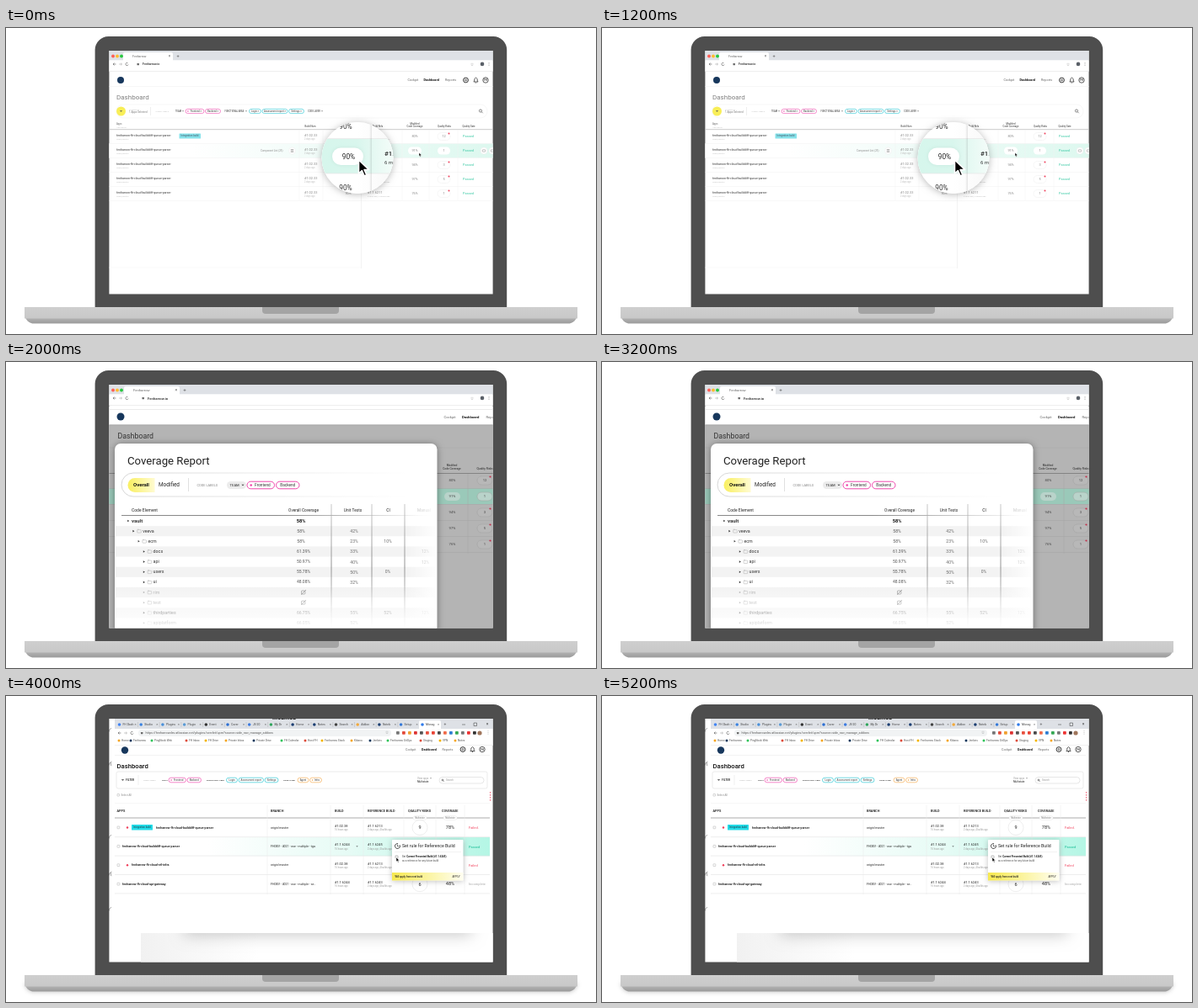
An HTML page with a canvas for the animation above (6000 ms loop, 700x364 px).

```html
<!DOCTYPE html>
<html lang="en">
<head>
<meta charset="utf-8">
<title>Dashboard tour</title>
<style>
html, body { margin: 0; width: 100%; height: 100%; overflow: hidden; background: #fff; }
canvas { display: block; width: 700px; height: 364px; }
</style>
</head>
<body>
<canvas id="stage" width="700" height="364"></canvas>
<script>
const c = document.getElementById('stage').getContext('2d');
const PINK = '#ee3fa8', CYAN = '#1fc3d0', GREEN = '#2fc6a0', RED = '#f0405c', ORANGE = '#f5a84a', NAVY = '#17375c';
const APP = 'fenharrow-fh-cloud-builddiff-queue-parser';

// ---- helpers ----
function text(s, x, y, size, color = '#333', weight = 400, align = 'left') {
  c.font = `${weight} ${size}px Roboto, sans-serif`;
  c.fillStyle = color;
  c.textAlign = align;
  c.textBaseline = 'middle';
  c.fillText(s, x, y);
}
const mid = (s, x, y, size, color, weight) => text(s, x, y, size, color, weight, 'center');

function rect(x, y, w, h, fill) {
  c.fillStyle = fill;
  c.fillRect(x, y, w, h);
}
function box(x, y, w, h, r, fill, stroke, lw = 0.6) {
  c.beginPath();
  c.roundRect(x, y, w, h, r);
  if (fill) { c.fillStyle = fill; c.fill(); }
  if (stroke) { c.strokeStyle = stroke; c.lineWidth = lw; c.stroke(); }
}
function dot(x, y, r, fill, stroke, lw = 0.6) {
  box(x - r, y - r, 2 * r, 2 * r, r, fill, stroke, lw);
}
function path(points, color, lw = 0.6, fill) {
  c.beginPath();
  points.forEach(([x, y]) => c.lineTo(x, y));
  if (fill) { c.closePath(); c.fillStyle = fill; c.fill(); }
  if (color) { c.strokeStyle = color; c.lineWidth = lw; c.lineJoin = 'round'; c.stroke(); }
}
const line = (x1, y1, x2, y2, color, lw) => path([[x1, y1], [x2, y2]], color, lw);

function fade(x1, y1, x2, y2, ...colors) {
  const g = c.createLinearGradient(x1, y1, x2, y2);
  colors.forEach((color, i) => g.addColorStop(i / (colors.length - 1), color));
  return g;
}
function shadowed(blur, dy, color, draw) {
  c.save();
  c.shadowBlur = blur;
  c.shadowOffsetY = dy;
  c.shadowColor = color;
  draw();
  c.restore();
}
function caret(x, y, s, color = '#333') {
  path([[x - s, y - s / 2], [x + s, y - s / 2], [x, y + s / 2]], null, 0, color);
}
function cursor(x, y, s) {
  const shape = [[0, 0], [0, 16], [3.8, 12.6], [6.6, 19], [9.4, 17.8], [6.6, 11.6], [12, 11.4]];
  path(shape.map(([a, b]) => [x + a * s, y + b * s]), '#fff', 1.6 * s, '#000');
}
function pill(label, x, w, y, h, size, color, marked) {
  box(x, y - h / 2, w, h, h / 2, '#fff', color, h / 9);
  if (marked) dot(x + h * 0.55, y, h / 7, color);
  mid(label, x + w / 2 + (marked ? h * 0.25 : 0), y + 0.2, size, '#333');
}
function search(x, y, r) {
  dot(x, y, r, null, '#444');
  line(x + r * 0.7, y + r * 0.7, x + r * 1.7, y + r * 1.7, '#444');
}
function menuIcons([gear, bell, user], y) {
  dot(gear, y, 2.9, null, '#333', 1);
  dot(gear, y, 1, null, '#333', 0.7);
  path([[bell - 2.6, y + 2], [bell - 1.8, y + 1], [bell - 1.6, y - 1.5], [bell, y - 3],
    [bell + 1.6, y - 1.5], [bell + 1.8, y + 1], [bell + 2.6, y + 2], [bell - 2.6, y + 2]], '#333', 0.8);
  dot(bell, y + 3, 0.6, '#333');
  dot(user, y, 3.2, null, '#333', 0.8);
  mid('FH', user, y + 0.2, 2.8, '#333', 700);
}
function nav(y, xs, size) {
  ['Cockpit', 'Dashboard', 'Reports'].forEach((s, i) =>
    text(s, xs[i], y, size, i === 1 ? '#111' : '#666', i === 1 ? 700 : 400));
}
function browserArrows(y, x = 127) {
  path([[x + 1.5, y - 1.4], [x, y], [x + 1.5, y + 1.4]], '#555');
  line(x, y, x + 3.4, y, '#555');
  path([[x + 9, y - 1.4], [x + 10.5, y], [x + 9, y + 1.4]], '#aaa');
  line(x + 7, y, x + 10.5, y, '#aaa');
  c.beginPath();
  c.arc(x + 16.5, y, 1.6, 0.3, 5.4);
  c.strokeStyle = '#555';
  c.stroke();
}
function simpleBrowser(y, tabX, tabW, urlX, size) {
  rect(122, 27, 456, y + 5 - 27, '#dee1e6');
  box(tabX, 29, tabW, y + 6 - 29, [2, 2, 0, 0], '#fff');
  ['#ff5f57', '#febc2e', '#28c840'].forEach((color, i) => dot(127 + i * 5, y, 1.9, color));
  text('Fenharrow', tabX + 11, y + 0.3, size, '#666');
  mid('×', tabX + tabW - 4, y, size + 1, '#555');
  mid('+', tabX + tabW + 6, y, size + 2, '#555');
  rect(122, y + 5, 456, 13, '#fff');
  browserArrows(y + 9.5);
  box(urlX - 6.5, y + 8.6, 2.4, 2.2, 0.4, '#666');
  text('Fenharrow.io', urlX, y + 9.8, size, '#222', 500);
  mid('☆', 553, y + 9.6, 5, '#777');
  dot(565, y + 9.4, 2.3, '#5a6068');
  for (let i = -1; i < 2; i++) dot(573, y + 9.4 + i * 1.5, 0.45, '#555');
  line(122, y + 18, 578, y + 18, '#e2e2e2');
}

function screenPath() {
  c.beginPath();
  c.rect(122.4, 27, 455.2, 289.6);
}
function laptop(lifted) {
  rect(0, 0, 700, 364, '#fff');
  box(105.6, 10, 488.6, 325, [16, 16, 0, 0], '#4e4e4e');
  screenPath();
  c.fillStyle = '#fff';
  c.fill();
  const underside = () => box(22, 340, 656, 11.5, [0, 0, 28, 28], fade(0, 345, 0, 351, '#b4b4b4', '#9c9c9c'));
  if (lifted) shadowed(5, 1, 'rgba(0,0,0,.2)', underside);
  else underside();
  rect(22, 332, 656, 13.5, fade(0, 332, 0, 346, '#cfcfcf', '#c8c8c8'));
  box(304, 332, 91, 8, [0, 0, 4, 4], '#a4a4a4');
}

const metrics = [['80%', '12'], ['91%', '1'], ['94%', '3'], ['97%', '5'], ['76%', '1']];

// ---- scenes ----
function overview() {
  simpleBrowser(33.5, 139, 59, 162, 3.5);
  dot(136, 62, 4, NAVY);
  nav(62, [476.5, 495.5, 521], 3.8);
  menuIcons([545.5, 557.5, 569], 62);
  line(122, 69.5, 578, 69.5, '#f2f2f2');
  text('Dashboard', 131, 82.5, 8, '#808080');

  box(131, 91, 440, 16, 8, '#fff', '#f1f1f1');
  dot(136.5, 99, 5.5, '#f8ee57');
  caret(136.5, 99, 1.6, '#555');
  text('FILTERED BY', 146, 97, 2.2, '#bbb');
  text('1 Apps Selected', 146, 100.5, 3, '#777');
  line(171.5, 94, 171.5, 104, '#ddd', 0.5);
  text('CODE LABELS', 177.5, 99, 2.5, '#bbb');
  text('TEAM', 201, 99, 2.6);
  text('FUNCTIONAL AREA', 259.5, 99, 2.6);
  text('CODE LAYER', 358, 99, 2.6);
  [210, 285, 375].forEach(x => caret(x, 99, 0.9));
  pill('Frontend ×', 213, 22, 99, 5.2, 2.8, PINK, true);
  pill('Backend ×', 236.5, 18, 99, 5.2, 2.8, PINK);
  pill('Login ×', 288.5, 14, 99, 5.2, 2.8, CYAN);
  pill('Assessment report ×', 304, 30, 99, 5.2, 2.8, CYAN);
  pill('Settings ×', 335.5, 18, 99, 5.2, 2.8, CYAN);
  search(563, 98.5, 1.6);

  text('Apps', 131, 114, 2.8, '#666');
  text('App Name', 131, 117.8, 2.5, '#bbb');
  mid('Build Num', 361, 117.5, 2.8);
  mid('Build Refs', 441, 117.5, 2.8);
  mid('Modified', 485, 114, 2.8);
  mid('Code Coverage', 485, 117.6, 2.8);
  mid('Quality Risks', 520, 117.5, 2.8);
  mid('Quality Gate', 549, 117.5, 2.8);
  line(122, 120.7, 578, 120.7, '#bcbcbc', 0.8);

  rect(122, 137.5, 456, 17, fade(220, 0, 578, 0, '#fff', '#eefbf7', '#ddf8ef'));
  metrics.forEach(([coverage, risks], i) => {
    const y = 129 + i * 17, active = i === 1;
    text(APP, 131, y - 1.4, 3.5, '#333');
    text('origin/master', 131, y + 3.2, 2.4, '#bbb');
    text('#1.02.33', 354, y - 1, 3.9, '#888');
    text('2 days ago', 354, y + 3.4, 2.6, '#bbb');
    mid('90%', 406, y, 3.9, '#888');
    text('#1.1.6211', 429, y - 1, 3.9, '#888');
    text('6 mon ago, 6 builds ago', 429, y + 3.4, 2.5, '#bbb');
    if (active) box(477, y - 4.5, 16, 9, 4.5, '#fff');
    box(512, y - 4.5, 15, 9, 4.5, '#fff', active ? null : '#ececec', 0.5);
    mid(coverage, 485, y, 3.9, '#888');
    mid(risks, 519.5, y, 3.9, '#888');
    if (!active) dot(525.5, y - 3.5, 1, RED);
    mid('Passed', 548.5, y, 3.9, GREEN);
    line(122, y + 8.5, 578, y + 8.5, '#f1f1f1', 0.5);
  });
  box(205.5, 125.5, 25.5, 6, 0.5, '#86e2ea');
  mid('Integration build', 218, 128.6, 2.9, '#456');
  text('Component List (25)', 302, 146, 2.9, '#888');
  dot(339.5, 146, 4, '#fff', '#e8e8e8', 0.4);
  for (let i = -1; i < 2; i++) line(337.8, 146 + i * 1.4, 341.2, 146 + i * 1.4, '#666', 0.5);
  [567, 577].forEach(x => {
    dot(x, 146, 4, '#fff', '#e8e8e8', 0.4);
    box(x - 1.7, 144.8, 3.4, 2.4, 0.4, null, '#888', 0.5);
  });
  [348, 376, 470, 502, 536].forEach(x => line(x, 122, x, 205, '#f2f2f2', 0.5));
  line(421.5, 122, 421.5, 286, '#ebebeb', 0.6);
  line(122, 285, 421, 285, '#f6f6f6', 0.6);
  cursor(490, 148.5, 0.25);
  magnifier();
}

function magnifier() {
  shadowed(9, 1, 'rgba(0,0,0,.28)', () => dot(417, 154.5, 42.5, '#fff'));
  c.save();
  c.beginPath();
  c.arc(417, 154.5, 42.5, 0, Math.PI * 2);
  c.clip();
  rect(374, 111, 86, 87, fade(374, 0, 460, 0, '#fff', '#fff', '#f8f8f8'));
  rect(374, 132, 86, 41, fade(374, 0, 460, 0, '#d6f6ec', '#d9f6ed', '#f4fcf9'));
  [131.5, 173].forEach(y => line(374, y, 460, y, '#e6e6e6', 0.7));
  rect(431, 111, 3, 87, fade(431, 0, 434, 0, 'rgba(0,0,0,0)', 'rgba(0,0,0,.1)'));
  mid('90%', 403, 118, 8.3, '#333');
  mid('90%', 403, 190.5, 8.3, '#333');
  shadowed(4, 0, 'rgba(0,60,40,.08)', () => box(387, 142.5, 37, 20.5, 10.2, '#fff'));
  mid('90%', 406.5, 153.5, 8.3, '#222');
  text('#1.1.6211', 449, 150, 7.8, '#222', 500);
  text('6 mon ago', 449, 160.5, 6, '#333');
  c.restore();
  cursor(418.5, 157, 1);
}

function report() {
  simpleBrowser(33.5, 140, 66, 168, 4.2);
  rect(122, 53, 456, 22, '#fff');
  line(122, 56.5, 578, 56.5, '#ddd');
  dot(136, 65, 4.5, NAVY);
  nav(65.3, [519.5, 541, 569.5], 4.2);

  rect(122, 74.5, 456, 243, '#b4b4b4');
  line(122, 75, 578, 75, '#9f9f9f');
  text('Dashboard', 132.5, 88, 8.8, '#333');
  line(122, 102, 578, 102, '#a6a6a6', 0.5);
  mid('Modified', 529, 123.5, 3.2, '#222');
  mid('Code Coverage', 529, 127.5, 3.2, '#222');
  text('Quality Risks', 558.5, 127, 3.4, '#222');
  line(122, 132.5, 578, 132.5, '#777', 0.8);
  rect(122, 150.5, 456, 18.5, '#9ac9b9');
  metrics.forEach(([coverage, risks], i) => {
    const y = 141 + i * 19;
    if (i === 1) box(520, y - 5, 19, 10, 5, '#b9d3ca');
    box(559, y - 5, 18, 10, 5, i === 1 ? '#b9d3ca' : '#b8b8b8', '#a0a0a0', 0.5);
    mid(coverage, 529.5, y, 4.2, '#444');
    mid(risks, 568, y, 4.2, '#444');
    if (i !== 1) dot(574.5, y - 4.5, 1.1, '#c5304c');
    line(122, y + 9.5, 578, y + 9.5, '#a2a2a2', 0.5);
  });
  line(548, 133, 548, 228, '#a4a4a4', 0.5);

  shadowed(8, 1, 'rgba(0,0,0,.4)', () => box(129, 97, 382.5, 230, 7, '#fff'));
  text('Coverage Report', 144, 118, 13.2, '#222');
  const edge = fade(137, 0, 480, 0, '#ccc', '#e6e6e6', '#fff');
  box(137, 132, 365, 28, 14, '#fff', edge, 0.8);
  box(144.5, 138, 32, 17, [8.5, 0, 0, 8.5], fade(144, 0, 176, 0, '#f9ef5e', '#fffbd0'));
  text('Overall', 151, 146.5, 6, '#111', 700);
  text('Modified', 181, 146.5, 6.4, '#222');
  line(216.5, 138, 216.5, 154, '#ccc');
  text('CODE LABELS', 226.5, 146.5, 3.9, '#888');
  box(262, 142, 23, 9, 4.5, '#ececec');
  text('TEAM', 265.5, 146.6, 4.2);
  caret(281, 146.6, 1.5);
  pill('Frontend', 286, 32.5, 146.5, 8.6, 4.7, PINK, true);
  pill('Backend', 320.5, 27.5, 146.5, 8.6, 4.7, PINK);

  text('Code Element', 149, 177, 5, '#222');
  mid('Overall Coverage', 353, 177, 4.8, '#222');
  mid('Unit Tests', 411.5, 177, 4.8, '#222');
  mid('CI', 453.5, 177, 4.8, '#222');
  text('Manual', 488, 177, 4.8, '#aaa');
  // name, depth, overall, unit tests, CI
  const tree = [
    ['vault', 0, '58%'], ['veeva', 1, '58%', '42%'], ['ecm', 2, '58%', '23%', '10%'],
    ['docs', 3, '61.39%', '33%'], ['api', 3, '50.97%', '40%'], ['users', 3, '55.78%', '50%', '0%'],
    ['ui', 3, '48.08%', '32%'], ['rim', 3, '-'], ['test', 3, '-'],
    ['thirdparties', 3, '66.75%', '55%', '52%'], ['apiplatform', 3, '66.05%', '52%']
  ];
  tree.forEach(([name, depth, overall, unit = '', ci = ''], i) => {
    const y = 189 + i * 12.15, x = 145 + depth * 6.2;
    const off = overall === '-', ink = off ? '#aaa' : '#333';
    if (i % 2) rect(130, y - 6, 381, 12.1, '#f3f3f3');
    path([[x - 0.8, y - 1.3], [x + 1.2, y], [x - 0.8, y + 1.3]], null, 0, ink);
    if (depth) {
      box(x + 4.5, y - 1.5, 4.6, 3.4, 0.5, null, '#aaa', 0.5);
      line(x + 4.5, y - 2, x + 6.5, y - 2, '#aaa', 0.5);
    }
    text(name, depth ? x + 11 : 149, y, depth ? 5.3 : 6, ink, depth ? 400 : 700);
    if (off) {
      box(350.5, y - 2, 4.4, 4, 0.8, null, '#777', 0.6);
      line(350, y + 2.8, 356, y - 3, '#777', 0.7);
    } else {
      mid(overall, depth < 3 ? 350 : 353, y, depth ? 5 : 5.7, depth ? '#555' : '#111', depth ? 400 : 700);
    }
    mid(unit, 413, y + 0.5, 5, '#666');
    mid(ci, 453, y, 5, '#666');
    if (i === 3 || i === 4 || i === 9) text('12%', 493, y + 0.5, 5, '#999');
  });
  line(137, 182.5, 505, 182.5, fade(137, 0, 505, 0, '#888', '#888', '#fff'), 1);
  [386, 434, 473].forEach(x => line(x, 169, x, 317, fade(0, 169, 0, 317, '#bbb', '#777', '#ddd'), 0.8));
  rect(476, 162, 35, 155, fade(476, 0, 511, 0, 'rgba(255,255,255,0)', 'rgba(255,255,255,.95)'));
  rect(130, 265, 381, 52, fade(0, 265, 0, 317, 'rgba(255,255,255,0)', 'rgba(255,255,255,.95)'));
}

function busyBrowser() {
  rect(129, 27, 449, 12, '#dee1e6');
  const tints = ['#4285f4', '#3b82e0', '#4a90d9', '#5b9bd5', '#333', '#2d6fd2', '#3c7be0', '#30a55c',
    '#1d3f72', '#1d3f72', '#444', '#f2a93b', '#1d3f72', '#3579d8'];
  const labels = ['FH Dash', 'Studio', 'Plugins', 'Plugin', 'Event', 'Cover', 'JS-20', 'My Dr',
    'Home', 'Notes', 'Search', 'Addon', 'Noteb', 'Setup'];
  tints.forEach((tint, i) => {
    const x = 131.5 + i * 25.7;
    dot(x + 3, 34, 1.8, tint);
    text(labels[i], x + 7, 34.2, 3.4, '#444');
    mid('×', x + 22, 34, 4, '#555');
    line(x + 25, 31, x + 25, 37, '#aaa', 0.4);
  });
  box(490, 29, 26, 11, [2, 2, 0, 0], '#fff');
  dot(494, 34, 1.8, '#2f7bea');
  text('Manag', 498, 34.2, 3.4, '#444');
  mid('×', 513, 34, 4, '#555');
  mid('+', 521, 34, 5, '#555');
  line(541, 34, 545, 34, '#333', 0.5);
  box(555, 32, 3.5, 3.5, 0, null, '#333', 0.5);
  mid('×', 571, 34, 5, '#333');

  rect(129, 39, 449, 20, '#fff');
  browserArrows(44, 133);
  box(157, 40, 300, 8, 4, '#f1f3f4');
  box(160, 43, 2.4, 2.2, 0.4, '#666');
  text('https://fenharrowdev.atlassian.net/plugins/servlet/upm?source=side_nav_manage_addons', 165.5, 44.2, 3.75, '#555');
  mid('☆', 452, 44, 5, '#777');
  ['#777', '#e34a3a', '#f0a030', '#d33', '#555', '#e8503e', '#e94335', '#4a4a4a', '#ef6b4a', '#2d7dd2',
    '#35a853', '#777', '#e33', '#333'].forEach((tint, i) => box(463 + i * 7, 42, 3.8, 3.8, 0.8, tint));
  dot(562, 44, 2.6, '#a0765c');
  mid('⋮', 572, 44, 5, '#555');

  const marks = [['Home', 137], ['Fenharrow', 151], ['PingNook Web', 176], ['FH Inbox', 217], ['FH Drive', 240],
    ['Private Inbox', 264], ['Private Drive', 297], ['FH Calendar', 330], ['Host FH', 358], ['Fenharrow Stack', 378],
    ['Kibana', 413], ['Jenkins', 435], ['Fenharrow GitOps', 456], ['Staging', 495], ['VPN', 518], ['Notes', 536]];
  const spots = ['#f5a623', NAVY, '#31c45b', '#dd4b39', '#f4b400'];
  marks.forEach(([s, x], i) => {
    dot(x - 3, 53, 1.5, spots[i % 5]);
    text(s, x, 53.2, 3.2, '#555');
  });
  line(129, 58.5, 578, 58.5, '#e3e3e3', 0.5);
}

function ruleSetup() {
  [40, 80, 167, 211, 253].forEach((y, i) => text(i % 2 ? 'y(' : "y'", 121, y, 5.5, '#333'));
  busyBrowser();
  text('Modified', 316, 26.4, 7, '#111', 700);
  dot(141, 64.5, 4.2, NAVY);
  nav(63.5, [474, 493, 517.5], 3.7);
  menuIcons([542, 553.5, 565], 63.5);
  line(129, 70.5, 574, 70.5, '#ebebeb', 0.6);
  text('Dashboard', 131.5, 83.3, 7.7, '#111', 500);

  box(131, 90, 440, 20, 2, '#fff', '#ddd');
  caret(138.5, 100, 1.7);
  text('FILTER', 142, 100.2, 3.3, '#222', 500);
  line(157, 94, 157, 106, '#ddd', 0.5);
  text('CODE LABELS', 163, 100.2, 2.3, '#aaa');
  text('TEAM', 185, 100.2, 2.4, '#222', 500);
  text('FUNCTIONAL AREA', 238, 100.2, 2.4, '#222', 500);
  text('CODE LAYER', 329, 100.2, 2.4, '#222', 500);
  pill('Frontend', 193, 20.5, 100, 5.6, 2.9, PINK, true);
  pill('Backend', 215, 16.5, 100, 5.6, 2.9, PINK);
  pill('Login', 261.5, 13, 100, 5.6, 2.9, CYAN);
  pill('Assessment report', 276, 29.5, 100, 5.6, 2.9, CYAN);
  pill('Settings', 307, 16, 100, 5.6, 2.9, CYAN);
  pill('Agent', 346, 13, 100, 5.6, 2.9, ORANGE);
  pill('Infra', 360.5, 14, 100, 5.6, 2.9, ORANGE, true);
  text('View apps', 488, 98, 2.9, '#999');
  caret(504, 98, 0.8);
  text('Multistate', 488, 101.8, 3, '#222');
  box(514, 96.5, 53, 7.5, 3.7, '#fff', '#ccc', 0.5);
  search(518, 100, 1);
  text('Search', 522, 100.3, 2.9, '#999');
  box(132, 116.5, 2.5, 2.5, 0.3, null, '#999', 0.4);
  text('Select All', 136.5, 118, 3, '#888');
  for (let i = 0; i < 4; i++) rect(574, 114 + i * 3, 0.8, 1.6, RED);

  [['APPS', 131.5], ['BRANCH', 314], ['BUILD', 390], ['REFERENCE BUILD', 429], ['QUALITY RISKS', 477], ['COVERAGE', 517]]
    .forEach(([s, x]) => text(s, x, 137, 3.85, '#111', 500));
  line(129, 127.5, 574, 127.5, '#eee', 0.5);
  line(129, 145, 574, 145, '#999', 0.8);
  [491, 527].forEach(x => {
    box(x - 8, 142.5, 16, 5, 2.5, '#fff', '#ddd', 0.4);
    mid('Multistate', x, 145.1, 2.6, '#777');
  });

  rect(129, 168, 445, 22.3, fade(240, 0, 574, 0, '#fff', '#e6fbf5', '#b4f6e5'));
  const rows = [
    [APP, 178, 'origin/master', '#1.02.38', '#1.1.6213', '9', '78%', 'Failed.', RED],
    [APP, 138, 'FHDEV - 4021 - ose - multiple - tga', '#1.1.6244', '#1.1.6245', '', '', 'Passed', GREEN],
    ['fenharrow-fh-cloud-etl-infra', 149, 'origin/master', '#1.02.38', '#1.1.6213', '', '', 'Failed', RED],
    ['fenharrow-fh-cloud-api-gateway', 138, 'FHDEV - 4021 - ose - multiple - se..', '#1.1.6244', '#1.1.6243', '6', '48%', 'Incomplete', '#aaa']
  ];
  rows.forEach(([name, x, branch, build, ref, risks, coverage, state, tint], i) => {
    const y = 156.5 + i * 22.4;
    box(132, y - 1.5, 2.8, 2.8, 0.4, null, '#999', 0.4);
    if (i % 2 === 0) dot(144, y, 1.2, RED);
    text(name, x, y, 3.6, '#000', 500);
    text(branch, 314, y, 3.5, '#222');
    text(build, 390, y - 1.7, 3.9, '#222');
    text('16 hours ago', 390, y + 3, 2.7, '#999');
    text(ref, 429, y - 1.7, 3.9, '#222');
    text('2 days ago, 4 builds ago', 429, y + 3, 2.7, '#999');
    if (risks) {
      dot(491, y, 9, '#fff', '#ddd', 0.5);
      mid(risks, 491, y + 0.3, 5.5, '#222');
      mid(coverage, 527, y, 5.6, '#222');
    }
    text(state, 549, y + 0.5, 4, tint, i === 1 ? 500 : 400);
    line(129, y + 11.2, 574, y + 11.2, '#ddd', 0.5);
  });
  box(149, 153, 25, 6.5, 0.6, '#23dce8');
  mid('Integration build', 161.5, 156.4, 2.9, '#134');
  caret(416.5, 179, 1.2);
  [310, 385, 424, 472, 510, 544].forEach(x => line(x, 130, x, 236, '#e8e8e8', 0.5));

  // sheet edge and its soft shadow below the table
  rect(160, 282, 418, 35, fade(160, 0, 300, 0, '#f1f1f1', '#fff'));
  shadowed(18, 3, 'rgba(0,0,0,.22)', () => box(212, 262, 340, 19, 2, '#fff'));
  rect(129, 240, 445, 42, '#fff');
  rulePopup();
}

function rulePopup() {
  shadowed(6, 1, 'rgba(0,0,0,.24)', () => box(458, 171, 84.5, 48.5, 1, '#fff'));
  c.beginPath();
  c.arc(464.5, 178.5, 3, -0.4, 4.9);
  c.strokeStyle = '#222';
  c.lineWidth = 0.8;
  c.stroke();
  path([[464.5, 176.5], [464.5, 178.8], [466.5, 178.8]], '#222', 0.6);
  text('Set rule for Reference Build', 470, 178.7, 5.2, '#222');
  line(461, 185.5, 540, 185.5, '#e5e5e5', 0.5);
  box(462, 190, 3, 3, 0.3, '#fff', '#777', 0.5);
  text('Set', 470, 191.3, 2.9, '#333');
  text('Current Presented Build (#1.1.6245)', 475.2, 191.3, 2.9, '#111', 700);
  text('as a reference for any future build', 470, 195.8, 2.9, '#444');
  cursor(463, 192, 0.32);
  rect(458, 210, 84.5, 9.5, fade(458, 0, 542, 0, '#f7e94f', '#fbf4a0', '#fffef0'));
  text('Will apply from next build', 461.5, 215, 2.9, '#222', 500);
  text('APPLY', 529.5, 215, 3.1, '#222');
}

// ---- timeline ----
const scenes = [overview, report, ruleSetup];
const HOLD = 2000;
let shown = -1;

function tick() {
  const index = Math.floor(performance.now() / HOLD) % scenes.length;
  if (index !== shown) {
    shown = index;
    laptop(scenes[index] === ruleSetup);
    c.save();
    screenPath();
    c.clip();
    scenes[index]();
    c.restore();
  }
  requestAnimationFrame(tick);
}
tick();
</script>
</body>
</html>
```
